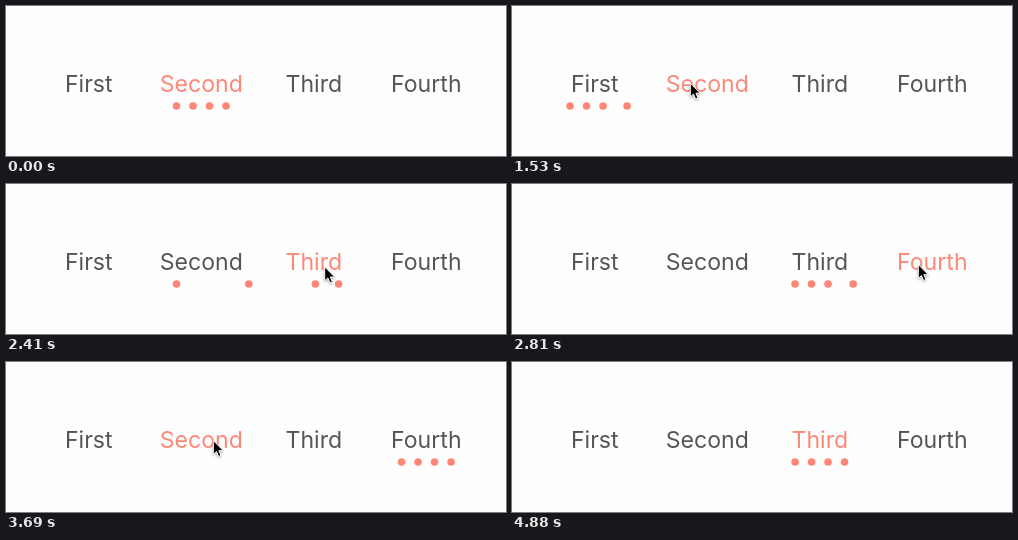
Animation of 500x150 px, one loop 5.38 s. Source, as an HTML page:

```html
<!DOCTYPE html>
<html lang="en">
<head>
<meta charset="utf-8">
<title>Dotted tab indicator</title>
<style>
  html, body { margin: 0; width: 100%; height: 100%; overflow: hidden; background: #fefefe; }
  svg { display: block; width: 500px; height: 150px; }
  text { font: 400 23.1px Inter, Roboto, sans-serif; text-anchor: middle; fill: #555; }
  text.on { fill: #ff8778; }
  circle { fill: #ff8576; }
  #cursor { fill: #000; stroke: #fff; stroke-width: 1; stroke-linejoin: round;
    filter: drop-shadow(0 1px 1px rgba(0, 0, 0, .35)); }
</style>
</head>
<body>
<svg id="stage" viewBox="0 0 500 150">
  <path id="cursor" d="M0 0V14L3.2 11.1L5.3 16L7.7 15L5.6 10.2H10Z"/>
</svg>
<script>
const LOOP = 5380, ORIGIN = 780, TICK = 57.75;
const TABS = ["First", "Second", "Third", "Fourth"];
const GAP = 16.5, DOTS = 4, FIRST_TAB = 1;
const LAG = 33, STAGGER = 90, TRAVEL = 220;
const EARLY = 130, LINGER = 180;  // pointer rest before and after a click

const tabX = i => 82.8 + 112.5 * i;
const home = (tab, dot) => tabX(tab) + (dot - (DOTS - 1) / 2) * GAP;

const ENTER = { t: 300, x: 94, y: 126 }, EXIT = { t: 4850, x: 417, y: 133 };
const click = (t, tab, dx, y) => ({ t, tab, x: tabX(tab) + dx, y });
const CLICKS = [
  click(777, 0, -9, 75.5),
  click(1480, 1, -17, 77),
  click(2120, 2, -14, 83.5),
  click(2749, 3, -14, 80.5),
  click(3650, 1, 12, 78.5),
  click(4215, 2, -14, 84)
];

const stage = document.getElementById("stage");
const cursor = document.getElementById("cursor");

function add(tag, attrs) {
  const el = document.createElementNS("http://www.w3.org/2000/svg", tag);
  for (const name in attrs) el.setAttribute(name, attrs[name]);
  return stage.insertBefore(el, cursor);
}

const labels = TABS.map((name, i) => {
  const el = add("text", { x: tabX(i), y: 85.6 });
  el.textContent = name;
  return el;
});
const dots = Array.from({ length: DOTS }, () => add("circle", { cy: 100, r: 3.8 }));

// cubic-bezier(.25, .1, .25, 1)
function ease(p) {
  if (p <= 0) return 0;
  if (p >= 1) return 1;
  let lo = 0, hi = 1, u;
  for (let i = 0; i < 24; i++) {
    u = (lo + hi) / 2;
    if (.75 * u * (1 - u) + u ** 3 < p) lo = u; else hi = u;
  }
  return .3 * u * (1 - u) ** 2 + 3 * u * u * (1 - u) + u ** 3;
}

function smooth(p) {
  p = Math.min(1, Math.max(0, p));
  return p * p * (3 - 2 * p);
}

function dotX(dot, t) {
  let tab = FIRST_TAB, x = home(tab, dot);
  for (const c of CLICKS) {
    if (t < c.t) break;
    // the dot nearest the new tab leads
    const order = c.tab > tab ? DOTS - 1 - dot : dot;
    const p = ease((t - c.t - LAG - order * STAGGER) / TRAVEL);
    x += (home(c.tab, dot) - x) * p;
    tab = c.tab;
  }
  return x;
}

// rest around each click, glide in between
function pointer(t) {
  let { x, y } = ENTER, leave = ENTER.t;
  for (const stop of [...CLICKS, EXIT]) {
    const arrive = stop === CLICKS[0] ? ENTER.t + 120 : stop === EXIT ? EXIT.t : stop.t - EARLY;
    const p = smooth((t - leave) / (arrive - leave));
    x += (stop.x - x) * p;
    y += (stop.y - y) * p;
    leave = stop.t + LINGER;
  }
  return [x, y];
}

// the picture advances in even ticks
function snap(t) {
  const step = t < ORIGIN ? 60 : TICK, slack = t < ORIGIN ? 0 : 4;
  return ORIGIN + Math.floor((t - ORIGIN + slack) / step) * step;
}

function draw(time) {
  const t = snap(time % LOOP);
  const active = CLICKS.reduce((tab, c) => t >= c.t ? c.tab : tab, FIRST_TAB);
  labels.forEach((el, i) => el.classList.toggle("on", i === active));
  dots.forEach((el, i) => el.setAttribute("cx", dotX(i, t).toFixed(2)));
  cursor.style.display = t >= ENTER.t && t < EXIT.t ? "" : "none";
  cursor.setAttribute("transform", `translate(${pointer(t)})`);
}

const start = performance.now();
function loop() {
  draw(performance.now() - start);
  requestAnimationFrame(loop);
}
loop();
</script>
</body>
</html>
```
